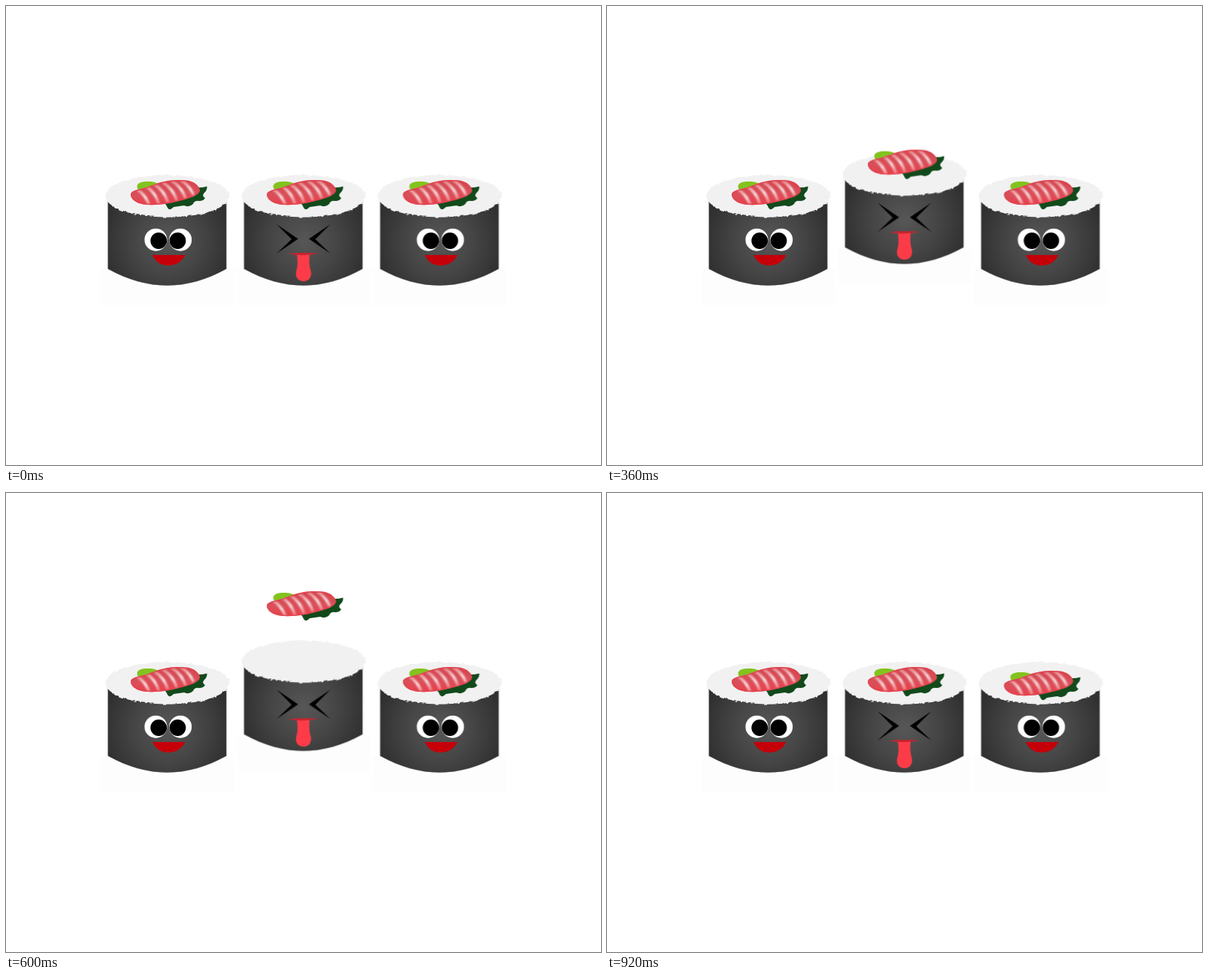
Write an HTML page without scripts that moves like this. It is 792 px wide and 612 px high and loops after 0.96 s.

```html
<!DOCTYPE html>
<html lang="en">
<head>
<meta charset="utf-8">
<title>Jumping sushi rolls</title>
<style>
  html, body { margin: 0; width: 100%; height: 100%; overflow: hidden; background: #fff; }
  svg { display: block; width: 792px; height: 612px; }

  /* Each hop moves in whole 40 ms ticks; the topping lands one tick after its roll. */
  .hop { animation: 960ms steps(4, end) infinite; }
  .left.body { animation-name: left-body; }
  .left.top { animation-name: left-top; }
  .middle.body { animation-name: middle-body; }
  .middle.top { animation-name: middle-top; }
  .right.body { animation-name: right-body; }
  .right.top { animation-name: right-top; }

  @keyframes left-body {
    0% { transform: translateY(0); }
    16.666% { transform: translateY(-45px); }
    33.333%, 100% { transform: translateY(0); }
  }
  @keyframes left-top {
    0% { transform: translateY(0); animation-timing-function: steps(5, end); }
    20.833% { transform: translateY(-122px); }
    37.499%, 100% { transform: translateY(0); }
  }
  @keyframes middle-body {
    0%, 33.333% { transform: translateY(0); }
    49.999% { transform: translateY(-115px); }
    66.666%, 100% { transform: translateY(0); }
  }
  @keyframes middle-top {
    0%, 33.333% { transform: translateY(0); animation-timing-function: steps(5, end); }
    54.166% { transform: translateY(-202px); }
    70.833%, 100% { transform: translateY(0); }
  }
  @keyframes right-body {
    0%, 66.666% { transform: translateY(0); }
    83.333% { transform: translateY(-36px); animation-timing-function: steps(3, end); }
    95.833%, 100% { transform: translateY(0); }
  }
  @keyframes right-top {
    0%, 66.666% { transform: translateY(0); animation-timing-function: steps(5, end); }
    87.499% { transform: translateY(-85px); animation-timing-function: steps(2, end); }
    95.833%, 100% { transform: translateY(5px); }
  }
</style>
</head>
<body>
<svg viewBox="0 0 792 612" xmlns="http://www.w3.org/2000/svg">
  <defs>
    <radialGradient id="nori" gradientUnits="userSpaceOnUse" cx="215" cy="314" r="86">
      <stop offset="0" stop-color="#575757"/>
      <stop offset=".5" stop-color="#464646"/>
      <stop offset="1" stop-color="#303030"/>
    </radialGradient>
    <linearGradient id="salmon" x1="0" y1="0" x2=".15" y2="1">
      <stop offset="0" stop-color="#d2404a"/>
      <stop offset=".6" stop-color="#d9505a"/>
      <stop offset="1" stop-color="#e8404c"/>
    </linearGradient>
    <linearGradient id="fat" x1="0" y1="0" x2="0" y2="1">
      <stop offset="0" stop-color="#fbdcdc" stop-opacity=".4"/>
      <stop offset=".45" stop-color="#fff0f0" stop-opacity=".95"/>
      <stop offset="1" stop-color="#fbdcdc" stop-opacity=".25"/>
    </linearGradient>
    <filter id="soft" x="-10%" y="-20%" width="120%" height="140%">
      <feGaussianBlur stdDeviation=".9"/>
    </filter>
    <filter id="grainy" color-interpolation-filters="sRGB">
      <feTurbulence type="fractalNoise" baseFrequency=".16" numOctaves="2" seed="4"/>
      <feDisplacementMap in="SourceGraphic" scale="5" xChannelSelector="R" yChannelSelector="G"/>
    </filter>
    <path id="fillet" d="M166 251.500C166 247 173 245 181 243.500C194 240 202 235 216 233C228 231.500 239 232 245 233.500C252 235.500 258 241 258 246C257 252 247 255.500 234 259C217 264 197 266.500 183 264.500C172 262.500 166 257 166 251.500Z"/>
    <clipPath id="fillet-clip"><use href="#fillet"/></clipPath>
    <path id="stripe" d="M178 239Q193 247 198 266"/>

    <g id="roll">
      <rect x="126" y="350" width="178" height="49.500" fill="#fefdfd"/>
      <path d="M135.800 261V350.500Q214.500 394.500 293.200 350.500V261Z" fill="url(#nori)" stroke="#444" stroke-width=".5"/>
      <ellipse cx="215" cy="253.500" rx="82.500" ry="28.200" fill="#f1f1f1" filter="url(#grainy)"/>
    </g>

    <g id="smile">
      <g fill="#fff">
        <circle cx="199.400" cy="311.700" r="15"/>
        <circle cx="232.200" cy="311.700" r="15"/>
      </g>
      <circle cx="203.200" cy="313" r="10.900"/>
      <circle cx="228.500" cy="313" r="10.900"/>
      <path d="M195 332H238.500C234 341 226 346 216 346C206 346 199 341 195 332Z" fill="#c50009"/>
    </g>

    <g id="grimace">
      <path id="squint" d="M179 291L207.500 310.500L179 330L199 311Z"/>
      <use href="#squint" transform="matrix(-1 0 0 1 429.500 0)"/>
      <path d="M206 331H223C222 340 222.500 346 224.500 353C226.500 362 221 367 215 367C208 367 203.500 362 205 354C207.500 346 207 340 206 331Z" fill="#fb3c48"/>
      <path d="M194 330.500Q214 328 235 330Q214 334 194 330.500Z" fill="#c8242f"/>
    </g>

    <g id="topping">
      <path d="M174.500 241C174 235 183 233.500 192 234Q204 235 203 240L186 247Q175 248 174.500 241Z" fill="#82c31e"/>
      <path d="M207 261Q213 263 215 269Q218 274 223 268Q230 267 237 266Q244 269 249 264Q251 259 257 260Q263 260 265 256Q260 253 264 249Q268 246 267.500 240.500Q262 242 257 242L230 250Z" fill="#124a1c"/>
      <use href="#fillet" fill="url(#salmon)"/>
      <g clip-path="url(#fillet-clip)">
        <g filter="url(#soft)" fill="none" stroke="url(#fat)" stroke-width="3.600">
          <use href="#stripe" x="-6" y="4"/>
          <use href="#stripe" x="6"/>
          <use href="#stripe" x="18" y="-2"/>
          <use href="#stripe" x="30" y="-4"/>
          <use href="#stripe" x="42" y="-6"/>
          <use href="#stripe" x="54" y="-7"/>
        </g>
        <use href="#fillet" fill="none" stroke="#e0434e" stroke-width="3.500" opacity=".75"/>
      </g>
    </g>
  </defs>

  <g>
    <g class="hop left body"><use href="#roll"/><use href="#smile"/></g>
    <g class="hop left top"><use href="#topping"/></g>
  </g>
  <g transform="translate(181.200)">
    <g class="hop middle body"><use href="#roll"/><use href="#grimace"/></g>
    <g class="hop middle top"><use href="#topping"/></g>
  </g>
  <g transform="translate(362.400)">
    <g class="hop right body"><use href="#roll"/><use href="#smile"/></g>
    <g class="hop right top"><use href="#topping"/></g>
  </g>
</svg>
</body>
</html>
```
